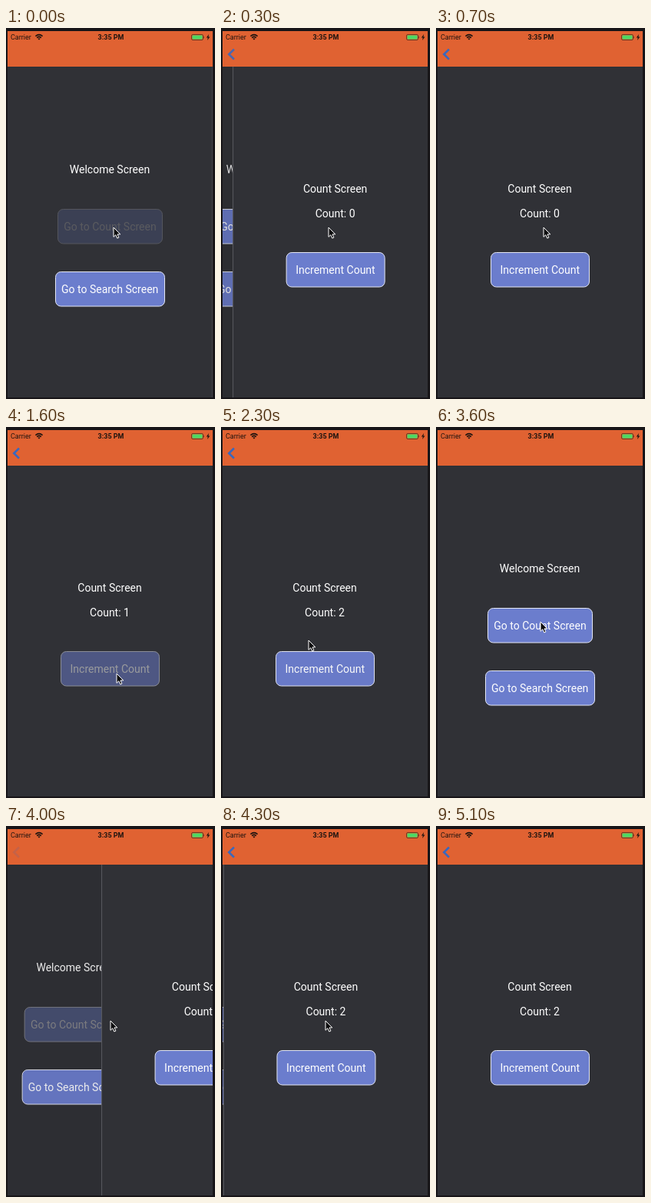
These frames come from a looping animation (272x480 px, 5200 ms). An HTML page:

```html
<!DOCTYPE html>
<html lang="en">
<head>
<meta charset="utf-8">
<title>Screen navigation</title>
<style>
  html, body { margin: 0; width: 100%; height: 100%; overflow: hidden; background: #171518; }
  svg { display: block; width: 272px; height: 480px; font: 14px Roboto, Inter, sans-serif; }
  .card text { fill: #fff; text-anchor: middle; }
  .button rect { fill: #6b7dcd; stroke: #e3e6f3; }
  .status { font-size: 9px; fill: #1f1410; }
</style>
</head>
<body>
<svg viewBox="0 0 272 480">
  <clipPath id="phone"><rect x="2" y="50" width="267" height="428"/></clipPath>
  <rect width="272" height="480" fill="#171518"/>
  <g clip-path="url(#phone)">
    <g id="welcome" class="card">
      <rect x="2" y="50" width="267" height="428" fill="#303136"/>
      <text x="135" y="188">Welcome Screen</text>
      <g id="goCount" class="button">
        <rect x="67.5" y="234.5" width="136" height="44.5" rx="7"/>
        <text x="135.5" y="262">Go to Count Screen</text>
      </g>
      <g class="button">
        <rect x="64.5" y="315.5" width="142" height="44.5" rx="7"/>
        <text x="135.2" y="343">Go to Search Screen</text>
      </g>
    </g>
    <g id="counter" class="card">
      <rect x="2" y="50" width="267" height="428" fill="#303136"/>
      <rect id="edge" x="1.5" y="50" width="1" height="428" fill="#5a5b60"/>
      <text x="135" y="213">Count Screen</text>
      <text id="count" x="135" y="244.5"></text>
      <g id="increment" class="button">
        <rect x="71.5" y="290.5" width="128" height="44.5" rx="7"/>
        <text x="135.3" y="318">Increment Count</text>
      </g>
    </g>
  </g>
  <rect x="2" y="4" width="267" height="46" fill="#e06232"/>
  <g class="status">
    <text x="6" y="15">Carrier</text>
    <text x="136.5" y="15" text-anchor="middle" font-weight="700">3:35 PM</text>
    <g fill="none" stroke="#1f1410" stroke-width="1.5">
      <path d="M38.4 10.6Q43 6.6 47.6 10.6M40.2 12.6Q43 10.2 45.8 12.6"/>
    </g>
    <path d="M41.3 13.8Q43 12.5 44.7 13.8L43 15.5Z"/>
    <rect x="241.5" y="8.5" width="15" height="7" rx="1.6" fill="none" stroke="#4a3020" stroke-width=".8"/>
    <rect x="242.5" y="9.5" width="13" height="5" rx=".8" fill="#4cd964"/>
    <path d="M257.4 10.5q1.2 1.5 0 3ZM264 8l-3.2 4.4h2L262 16l3.4-4.6h-2Z"/>
  </g>
  <path id="back" d="M17 27.5L10.3 34L17 40.5" fill="none" stroke="#3a68bd" stroke-width="2.6"/>
  <path id="cursor" d="M0 0V12.3L2.8 9.7L4.8 14L6.9 13.1L5 8.9H8.8Z" fill="#0c0c0e" stroke="#fff" stroke-width="1"/>
</svg>
<script>
const LOOP = 5200, STEP = 100, WIDTH = 267;
const PUSH = 60, POP = 2905, PUSH_AGAIN = 3916;
const GO_PRESSES = [[-200, 60], [3700, 3910]];
const ADD_PRESSES = [[1340, 1490], [1880, 2085]];
const BACK_PRESSES = [[2720, 2890]];
// time, x, y of the pointer tip
const POINTER = [
  [0, 140, 258], [720, 140, 258], [1220, 144, 319], [2090, 144, 319],
  [2300, 114, 276], [2680, 12, 35], [2900, 12, 35], [3100, 128, 227],
  [3550, 136, 252], [4400, 136, 252], [4850, 290, 430]
];

const el = id => document.getElementById(id);
const clamp = v => Math.min(1, Math.max(0, v));
const mix = (a, b, k) => a + (b - a) * k;
const easeInOut = u => u < .5 ? 2 * u * u : 1 - 2 * (1 - u) ** 2;
const bezier = (a, b, s) => 3 * (1 - s) * s * ((1 - s) * a + s * b) + s ** 3;

// cubic-bezier(.2833, .99, .31833, .99)
function slide(u) {
  u = clamp(u);
  let low = 0, high = 1;
  for (let i = 0; i < 24; i++) {
    const mid = (low + high) / 2;
    if (bezier(.2833, .31833, mid) < u) low = mid; else high = mid;
  }
  return bezier(.99, .99, high);
}

function progress(t) {
  if (t >= PUSH_AGAIN) return slide((t - PUSH_AGAIN) / 500);
  if (t >= POP) return 1 - slide((t - POP) / 500);
  return slide((t - PUSH) / 500);
}

function touchOpacity(t, presses) {
  const press = presses.filter(([down]) => t >= down).pop();
  if (!press) return 1;
  const [down, up] = press;
  return t < up
    ? mix(1, .2, easeInOut(clamp((t - down) / 150)))
    : mix(.2, 1, easeInOut(clamp((t - up) / 250)));
}

function pointerAt(t) {
  const next = POINTER.findIndex(([time]) => time > t);
  if (next < 0) return POINTER[POINTER.length - 1].slice(1);
  const [t0, x0, y0] = POINTER[next - 1], [t1, x1, y1] = POINTER[next];
  const k = (t - t0) / (t1 - t0);
  return [mix(x0, x1, k), mix(y0, y1, k)];
}

const move = (id, x, y = 0) => el(id).setAttribute("transform", `translate(${x} ${y})`);
const fade = (id, alpha) => el(id).setAttribute("opacity", alpha);

function draw(now) {
  const t = Math.floor(now % LOOP / STEP) * STEP;
  const p = progress(t);
  move("welcome", -.3 * WIDTH * p);
  fade("welcome", 1 - .15 * p);
  move("counter", WIDTH * (1 - p));
  fade("counter", p > 0 ? 1 : 0);
  fade("edge", p < .995 ? 1 : 0);
  fade("goCount", touchOpacity(t, GO_PRESSES));
  fade("increment", touchOpacity(t, ADD_PRESSES));
  fade("back", clamp((p - .45) / .55) * touchOpacity(t, BACK_PRESSES));
  el("count").textContent = "Count: " + ADD_PRESSES.filter(([, up]) => t >= up).length;
  move("cursor", ...pointerAt(t));
}

const start = performance.now();
(function frame() {
  draw(performance.now() - start);
  requestAnimationFrame(frame);
})();
</script>
</body>
</html>
```
